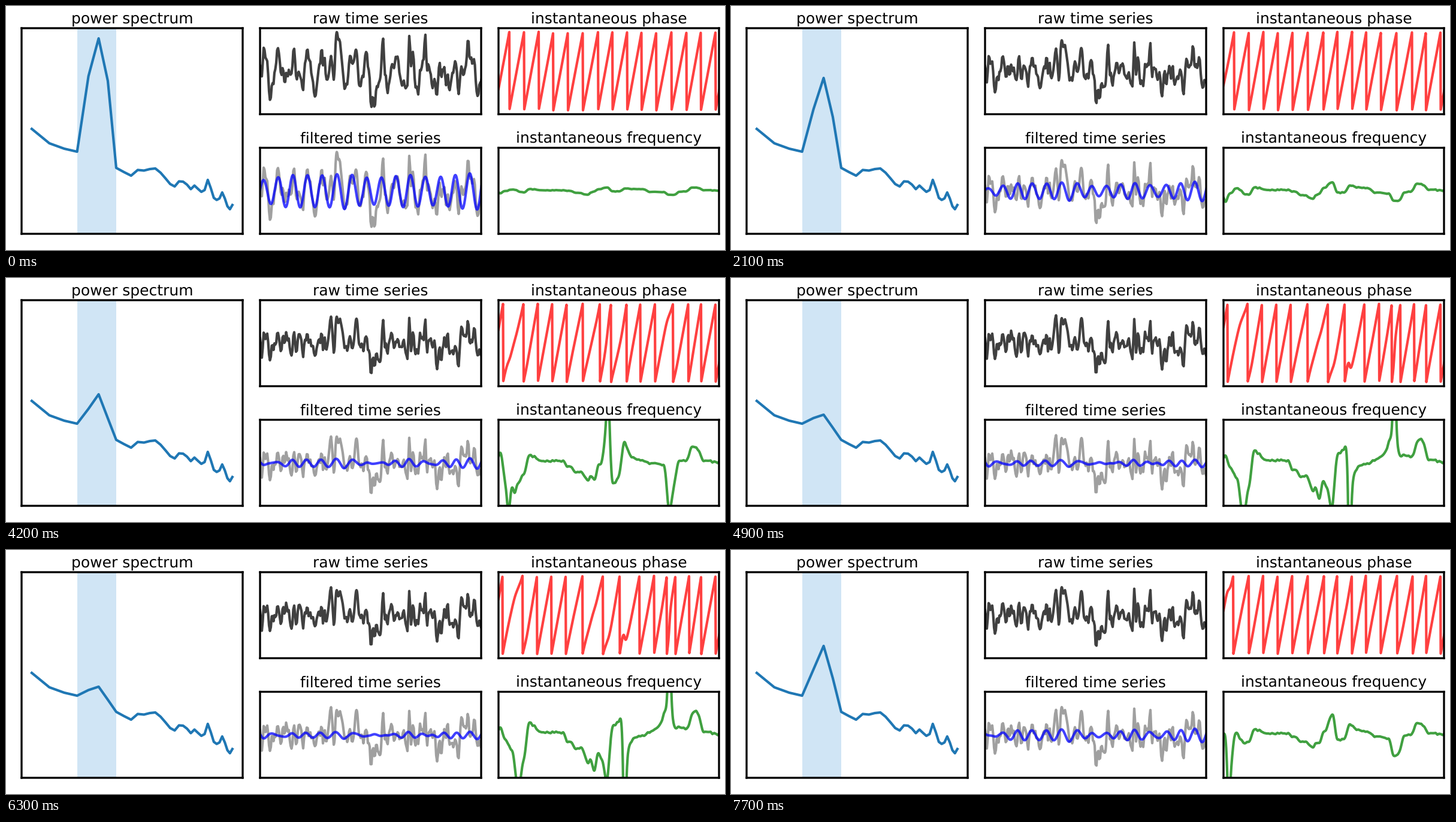
A matplotlib script that plays this animation: 1200x407 px, repeating every 8 s.

```python
import numpy as np
import matplotlib.pyplot as plt
from matplotlib.animation import FuncAnimation

W, H, DPI = 1200, 407, 64
PT = 72 / DPI          # points per pixel
STEP, TICK, LOOP = 700, 100, 8000
PERIOD = 24.57         # carrier wavelength in pixels
OMEGA = 2 * np.pi / PERIOD

plt.rcParams.update({"font.family": "DejaVu Sans", "text.hinting": "none",
                     "text.hinting_factor": 1})
rng = np.random.default_rng(4)

# Distance from the left edge of a right-hand panel
DX = 0.5
u = np.arange(0, 370, DX)
carrier = np.exp(1j * OMEGA * (u - 6))


def blur(values, width):
    """Hann-window average that keeps the ends in place."""
    n = int(width / DX) // 2
    window = np.hanning(2 * n + 3)[1:-1]
    return np.convolve(np.pad(values, n, mode="edge"),
                       window / window.sum(), mode="valid")


# Background activity in the band, as a slowly turning phasor:
# (position, real, imaginary)
PHASOR = [(0, -5.7, 2), (6, -5.4, 1), (17, -2.9, 1), (26, -2, 1.7),
          (33, 0, 2.2), (40, 2, 1.7), (47, 3, 0.8), (64, 2.8, 2.8),
          (88, 2.4, 3.3), (112, 2, 4), (124, 3.5, 4), (140, 6, 1.6),
          (153, 3.5, -2.6), (163, 0, -3), (174, -1.2, -1.7),
          (186, -1.8, 0.7), (202, -1.3, -0.1), (207, -0.6, -0.3),
          (217, 0.3, 1.2), (247, 3, 5), (280, -0.5, 1.4), (298, -0.5, -3.5),
          (318, 1.3, -5), (338, 5, -0.8), (362, 6.5, 0)]
px, re, im = np.array(PHASOR).T
background = blur(np.interp(u, px, re) + 1j * np.interp(u, px, im), 11)

# Broadband noise: slow drift, three sharp spikes and seeded jitter
DRIFT = [(0, 110), (38, 113), (76, 108), (126, 103), (161, 100), (181, 114),
         (200, 116), (216, 100), (238, 116), (271, 92), (296, 128),
         (316, 116), (346, 92), (369, 114)]
drift = blur(np.interp(u, *np.array(DRIFT).T), 16)
jitter = np.convolve(rng.normal(0, 16, len(u[::3])), [0.4, 0.8, 0.4], "same")
noise = drift + np.interp(u, u[::3], jitter)
for at, peak in ((128, 67), (161, 67), (200, 142)):
    near = np.exp(-((u - at) / 3) ** 2)
    noise += near * (peak - noise)
ripple = np.interp(u, u[::6], rng.normal(0, 1, len(u[::6])))

# Spectrum beside the peak, one value per frequency bin from 5 to 40
bins = np.arange(5, 41)
power_x = 43 + 161 * np.log(bins / 5)
BEFORE = [205, 229, 238, 243]
AFTER = [270, 277, 283, 273.5, 274.5, 272, 271, 278, 287.5, 297, 301, 292.5,
         293, 298, 305.5, 299.5, 305, 310, 307, 290, 304, 320, 323.5, 321,
         311, 321, 334, 339, 332]


def spectrum(level):
    tip = np.interp(level, [0, 2, 3, 5, 7, 8], [54, 87, 120, 160, 228, 254])
    drop = tip - 54
    left = 117 + 0.94 * drop - 0.00155 * drop ** 2
    right = 125 + 1.03 * drop - 0.0018 * drop ** 2
    return power_x, BEFORE + [left, tip, right] + AFTER


def signals(level):
    """Raw, filtered, phase and frequency curves in stage pixels."""
    gain = np.interp(level, [0, 3, 8], [24, 10, -2.5])
    z = background + gain
    wave = (z * carrier).real
    raw = noise - gain * carrier.real
    cycles = np.angle(-z * carrier) / (2 * np.pi) % 1
    turn = (np.gradient(z, DX) * z.conj()).imag / np.abs(z) ** 2
    freq = 308 - 150 * turn / OMEGA + ripple * (0.25 + 0.1 * level)
    return raw, 309 - wave, 174 - 131 * cycles, freq


# Figure
fig = plt.figure(figsize=(W / DPI, H / DPI), dpi=DPI, facecolor="white")


def panel(title, x0, y0, x1, y1):
    """Framed axes whose data units are stage pixels."""
    ax = fig.add_axes([x0 / W, 1 - y1 / H, (x1 - x0) / W, (y1 - y0) / H])
    ax.set(xlim=(x0, x1), ylim=(y1, y0), xticks=[], yticks=[])
    for spine in ax.spines.values():
        spine.set(linewidth=3.3 * PT, snap=False)
    ax.text((x0 + x1) / 2, y0 - 8.3, title, fontsize=24.8 * PT,
            ha="center", va="baseline")
    return ax


def trace(ax, color, alpha=0.75):
    return ax.plot([], [], color=color, alpha=alpha, lw=4.2 * PT)[0]


MID, FAR = 424, 822
power_ax = panel("power spectrum", 26, 37, 395, 380)
raw_ax = panel("raw time series", MID, 37, 793, 180.5)
filt_ax = panel("filtered time series", MID, 236.5, 793, 380)
phase_ax = panel("instantaneous phase", FAR, 37, 1190, 180.5)
freq_ax = panel("instantaneous frequency", FAR, 236.5, 1190, 380)

power_ax.axvspan(119, 184, color="#d0e5f5", lw=0)
power_line = trace(power_ax, "#1f77b4", 1)
raw_line = trace(raw_ax, "black")
back_line = trace(filt_ax, "gray")
filt_line = trace(filt_ax, "blue")
phase_line = trace(phase_ax, "red")
freq_line = trace(freq_ax, "green")


def draw(frame):
    step = frame * TICK // STEP
    level = min(step, 16 - step)     # fades out, then comes back
    raw, filtered, phase, freq = signals(level)
    power_line.set_data(*spectrum(level))
    raw_line.set_data(MID + u, raw)
    back_line.set_data(MID + u, raw + 200)
    filt_line.set_data(MID + u, filtered)
    phase_line.set_data(FAR + u, phase)
    freq_line.set_data(FAR + u, freq)
    return power_line, raw_line, back_line, filt_line, phase_line, freq_line


anim = FuncAnimation(fig, draw, frames=LOOP // TICK, interval=TICK,
                     repeat=True, repeat_delay=0)
plt.show()
```
